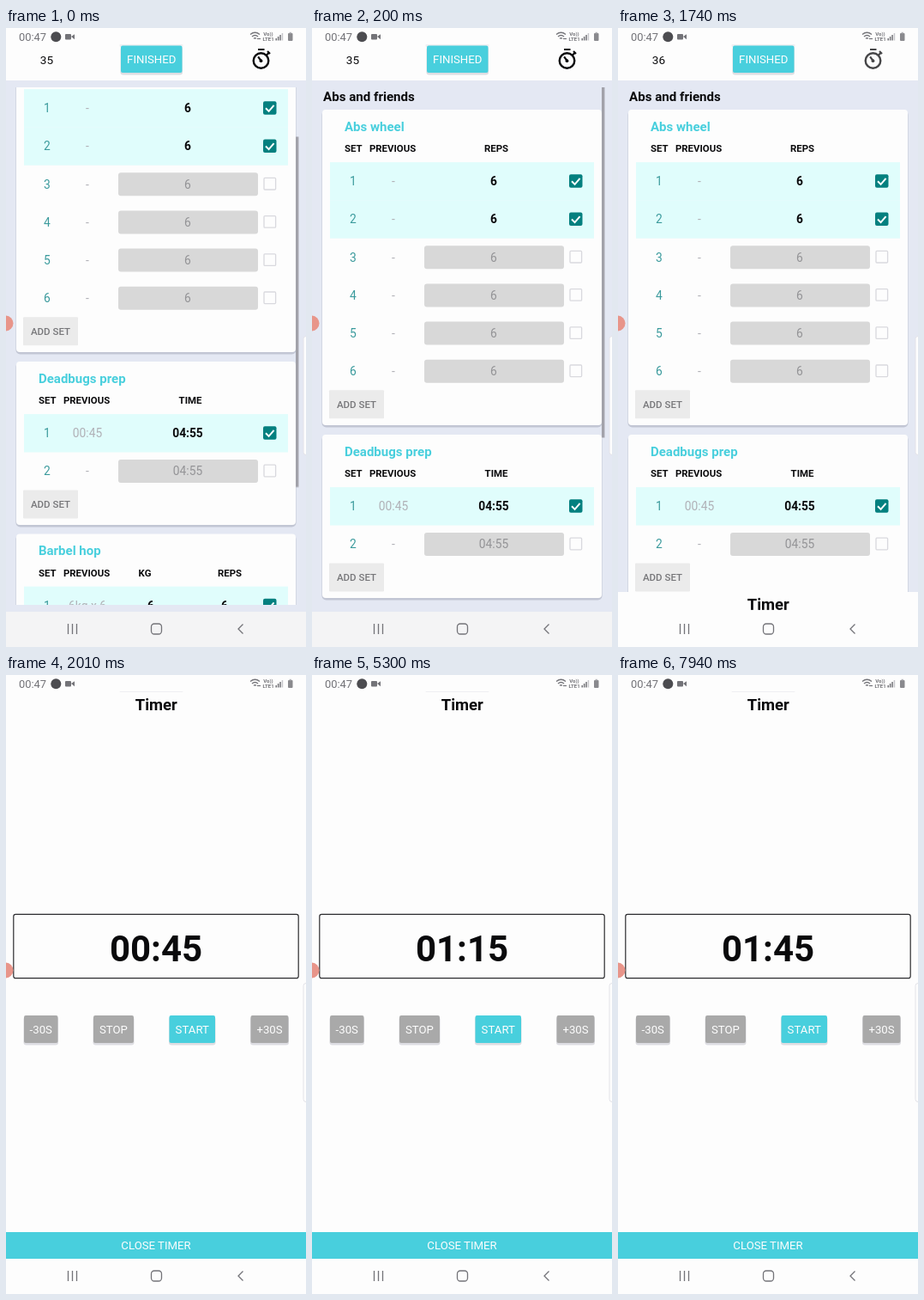
Write an HTML page that moves like this. It is 350 px wide and 720 px high and loops after 8 s.

```html
<!DOCTYPE html>
<html lang="en">
<head>
<meta charset="utf-8">
<title>Workout timer</title>
<style>
  html, body { margin: 0; width: 100%; height: 100%; overflow: hidden; background: #fdfdfd; }
  svg { display: block; width: 350px; height: 720px; font-family: Roboto, sans-serif; }
  .scroll { animation: scroll 8s infinite; }
  .bar { animation: bar 8s infinite; }
  .barFade { animation: barFade 8s infinite linear; }
  .sheet { animation: sheet 8s infinite; }
  .nav { animation: nav 8s infinite step-end; }
  .watch { animation: watch 8s infinite linear; }
  .press { animation: press 8s infinite linear; }
  .count1 { animation: count1 8s infinite step-end; }
  .count2 { animation: count2 8s infinite step-end; }
  .time1 { animation: time1 8s infinite step-end; }
  .time2 { animation: time2 8s infinite step-end; }
  .time3 { animation: time3 8s infinite step-end; }
  @keyframes scroll {
    0%, .75% { transform: translateY(-85px); animation-timing-function: ease-out; }
    2.4%, 100% { transform: none; }
  }
  @keyframes bar {
    0%, .75% { transform: translateY(57.5px); animation-timing-function: ease-out; }
    2.4%, 100% { transform: none; }
  }
  @keyframes barFade { 0%, 7% { opacity: 1; } 10.5%, 100% { opacity: 0; } }
  @keyframes sheet {
    0%, 20.95% { transform: translateY(699px); animation-timing-function: cubic-bezier(.37, 0, .63, 1); }
    25.1%, 100% { transform: none; }
  }
  @keyframes nav { 0% { fill: #f4f4f5; } 21.1%, 100% { fill: #fdfdfd; } }
  @keyframes watch { 0%, 19.2% { opacity: 1; } 20.6% { opacity: .4; } 21.75% { opacity: .75; } 23%, 100% { opacity: 1; } }
  @keyframes press {
    0%, 52% { opacity: 0; } 54%, 59% { opacity: 1; } 66%, 73% { opacity: 0; }
    75.5%, 82.5% { opacity: 1; } 91%, 100% { opacity: 0; }
  }
  @keyframes count1 { 0% { opacity: 1; } 11.4%, 100% { opacity: 0; } }
  @keyframes count2 { 0% { opacity: 0; } 11.4%, 100% { opacity: 1; } }
  @keyframes time1 { 0% { opacity: 1; } 56.5%, 100% { opacity: 0; } }
  @keyframes time2 { 0% { opacity: 0; } 56.5% { opacity: 1; } 78%, 100% { opacity: 0; } }
  @keyframes time3 { 0% { opacity: 0; } 78%, 100% { opacity: 1; } }
</style>
</head>
<body>
<svg id="stage" viewBox="0 0 350 720"></svg>
<script>
const AQUA = '#48cfdd', PAPER = '#fdfdfd', PAGE = '#e4e8f3', INK = '#0a0a0c';
const GREY = '#737378', BUTTON = '#a9a9a9';

const rect = (x, y, w, h, fill, more = '') =>
  `<rect x="${x}" y="${y}" width="${w}" height="${h}" fill="${fill}" ${more}/>`;

const line = (d, stroke, width, more = '') =>
  `<path d="${d}" fill="none" stroke="${stroke}" stroke-width="${width}" ${more}/>`;

// y is the vertical middle of the capitals
const text = (x, y, str, size, fill = INK, weight = 400, more = 'text-anchor="middle"') =>
  `<text x="${x}" y="${y + size * .355}" font-size="${size}" fill="${fill}" font-weight="${weight}" ${more}>${str}</text>`;

const leftText = (x, y, str, size, fill, weight) => text(x, y, str, size, fill, weight, '');

const raised = (x, y, w, h, fill) =>
  rect(x - .5, y + 1.5, w + 1, h + 1, '#c9c9d0', 'rx="3" opacity=".6"') + rect(x, y, w, h, fill, 'rx="2"');

const button = (x, y, w, h, fill, label) =>
  raised(x, y, w, h, fill) + text(x + w / 2, y + h / 2, label, 13.2, PAPER);

function setRow(y, number, previous, values, done) {
  const back = done ? rect(21, y - 22.2, 308, 44.4, '#e0fdfc') : rect(131, y - 13.5, 163, 27, '#d8d8d8', 'rx="3"');
  const box = done
    ? rect(300, y - 8, 15.5, 15.5, '#04807f', 'rx="2"') + line(`M303 ${y}l3.6 3.6l6-7`, '#fff', 2)
    : rect(301, y - 7.3, 13.6, 13.6, 'none', 'rx="1" stroke="#d9d9de" stroke-width="1.3"');
  return back + box + text(48, y, number, 13.8, '#3a9a9c')
    + text(95, y, previous, 13.8, '#b0b0b6')
    + values.map(([x, v]) => text(x, y, v, 13.8, done ? INK : '#939396', done ? 700 : 400)).join('');
}

function card(top, height, title, columns, rows) {
  const lastRow = top + 83.3 + 44.2 * (rows.length - 1);
  return rect(11.5, top + 1, 327, height + 1.5, '#c2c6d4', 'rx="5"')
    + rect(12, top, 326, height, PAPER, 'rx="4"')
    + leftText(38, top + 19.3, title, 15, AQUA, 700)
    + leftText(38, top + 45, 'SET', 11.4, INK, 700)
    + leftText(67, top + 45, 'PREVIOUS', 11.4, INK, 700)
    + columns.map(([x, name]) => text(x, top + 45, name, 11.4, INK, 700)).join('')
    + rows.map(([previous, values, done], i) => setRow(top + 83.3 + 44.2 * i, i + 1, previous, values, done)).join('')
    + rect(20, lastRow + 22, 64, 33, '#ebebeb', 'rx="1"')
    + text(52, lastRow + 38.5, 'ADD SET', 11.5, '#77777a', 500);
}

const single = (value, done, previous = '-') => [previous, [[212, value]], done];

const list = `<g clip-path="url(#view)"><g class="scroll">`
  + leftText(13, 80, 'Abs and friends', 15.1, INK, 700)
  + card(95, 367, 'Abs wheel', [[215, 'REPS']], Array.from({ length: 6 }, (_, i) => single('6', i < 2)))
  + card(473, 190, 'Deadbugs prep', [[215, 'TIME']], [single('04:55', true, '00:45'), single('04:55', false)])
  + card(673.5, 190, 'Barbel hop', [[162, 'KG'], [261, 'REPS']], [['6kg x 6', [[169, '6'], [255, '6']], true]])
  + `</g></g><g class="barFade">${rect(338, 69, 3.4, 407.5, '#a2a2aa', 'class="bar"')}</g>`;

const stopwatch = `<g class="watch">`
  + `<circle cx="297.5" cy="38" r="8.8" fill="none" stroke="${INK}" stroke-width="2.4"/>`
  + line('M294 25h7.5M304 31.5l3-3M305 27l3 3M297.5 38l-3.4-4.6', INK, 2.2)
  + `<circle cx="297.5" cy="38.2" r="1.9" fill="${INK}"/></g>`;

const header = rect(0, 0, 350, 61, PAPER)
  + text(47.5, 37, '35', 13.6, INK, 400, 'text-anchor="middle" class="count1"')
  + text(47.5, 37, '36', 13.6, INK, 400, 'text-anchor="middle" class="count2"')
  + rect(132.5, 19, 74, 3, '#efeff2', 'rx="1"')
  + button(134, 20.5, 71.5, 31.5, AQUA, 'FINISHED') + stopwatch;

const display = ['00:45', '01:15', '01:45'].map((time, i) =>
  text(175, 318, time, 42, INK, 700, `text-anchor="middle" class="time${i + 1}"`)).join('');

const sheet = `<g class="sheet">` + rect(0, 20, 350, 700, PAPER)
  + text(175.3, 34, 'Timer', 18.5, INK, 700)
  + rect(8.8, 278.3, 332.4, 74.4, PAPER, 'rx="2.5" stroke="#2b2b2e" stroke-width="1.2"') + display
  + button(21, 396, 39.5, 32, BUTTON, '-30S')
  + button(102, 396, 47, 32, BUTTON, 'STOP')
  + button(190.5, 396, 53.5, 32, AQUA, 'START')
  + raised(285.5, 396, 44, 32, BUTTON)
  + rect(285.5, 396, 44, 32, '#888888', 'rx="2" class="press"')
  + text(307.5, 412, '+30S', 13.2, PAPER)
  + rect(0, 648, 350, 31, AQUA) + text(175, 663.7, 'CLOSE TIMER', 13.2, PAPER) + `</g>`;

const status = leftText(15, 10.5, '00:47', 12.9, GREY)
  + `<circle cx="58.3" cy="10.3" r="6" fill="#4c4c50"/>`
  + rect(69, 7, 7, 6.5, GREY, 'rx="1"') + `<path d="M76 10l4-2.8v6z" fill="${GREY}"/>`
  + line('M285 7.5q5.5-4.5 11 0M287 10q3.5-3 7 0M289 12.3q1.5-1.3 3 0', GREY, 1.4)
  + line('M293 12.5h4', GREY, 1.2)
  + text(306, 7, 'Vo))', 6, GREY, 700) + text(306, 12.7, 'LTE1', 6, GREY, 700)
  + [0, 1, 2, 3].map(i => rect(314.5 + i * 2.4, 12 - i * 2, 1.5, 2.5 + i * 2, i < 3 ? GREY : '#c6c6ca')).join('')
  + rect(329, 6, 5.5, 9, '#8a8a8e', 'rx="1"') + rect(330.5, 4.8, 2.5, 1.5, '#b8b8bc');

const nav = rect(0, 679, 350, 41, '#f4f4f5', 'class="nav"')
  + line('M72.5 693v12M77.5 693v12M82.5 693v12', GREY, 1.3)
  + rect(169.5, 693, 12, 12, 'none', `rx="3.5" stroke="${GREY}" stroke-width="1.3"`)
  + line('M276.5 693.5l-5.5 5.5l5.5 5.5', GREY, 1.3);

const edges = `<circle cx="-.5" cy="343.5" r="9" fill="#e8958a"/>`
  + rect(347, 358.5, 12, 138, PAPER, 'rx="3" stroke="#e2e2e8" stroke-width="1"');

document.getElementById('stage').innerHTML =
  `<clipPath id="view"><rect y="69" width="350" height="602"/></clipPath>`
  + rect(0, 0, 350, 720, PAGE) + list + header + sheet + nav + status + edges;
</script>
</body>
</html>
```
